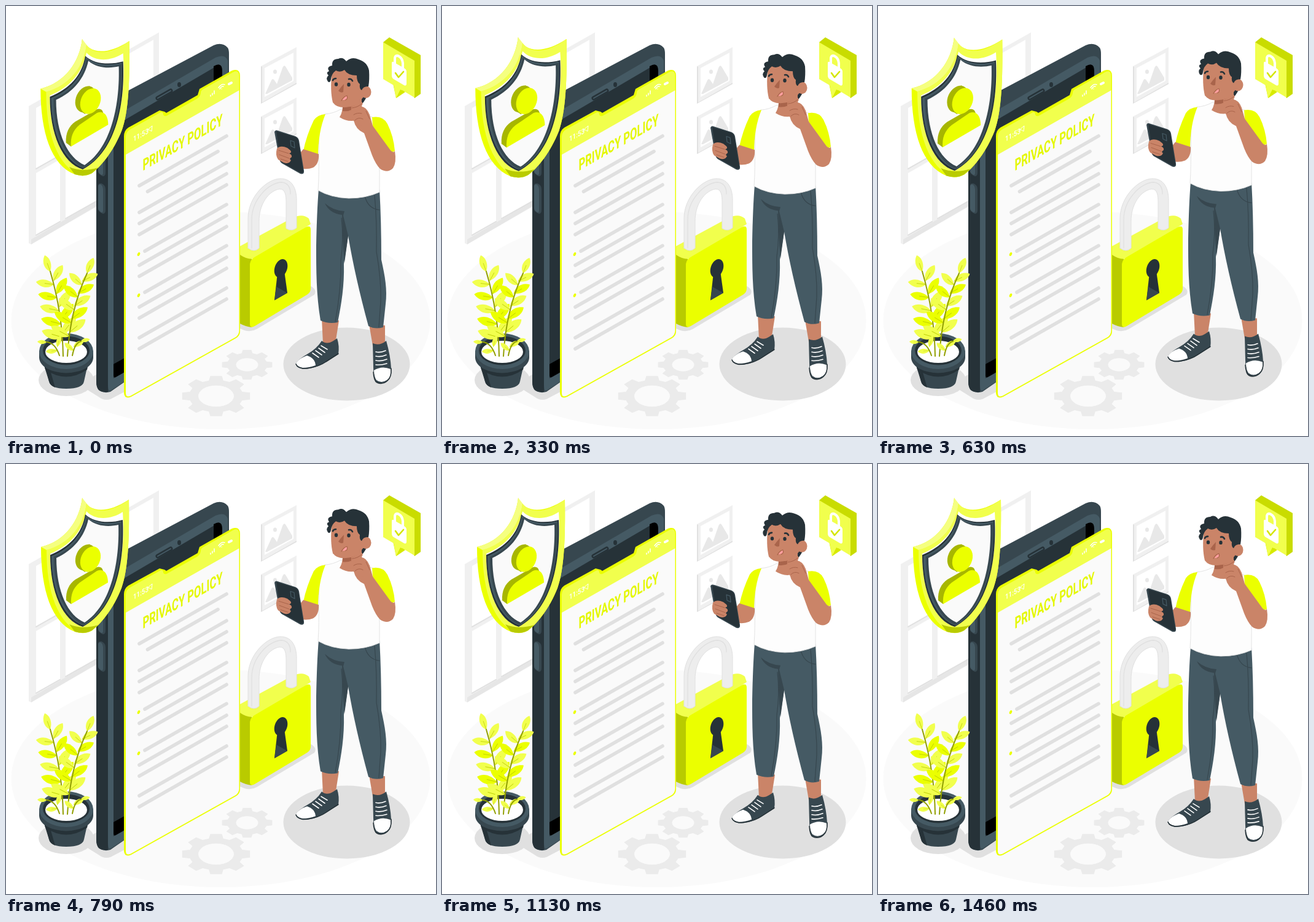
An HTML page with a canvas that plays this animation: 700x700 px, repeating every 1.5 s.

```html
<!DOCTYPE html>
<html lang="en">
<head>
<meta charset="utf-8">
<title>Privacy policy</title>
<style>
html, body { margin: 0; width: 100%; height: 100%; overflow: hidden; background: #fff; }
canvas { display: block; width: 100vw; height: 100vh; }
</style>
</head>
<body>
<canvas id="stage"></canvas>
<script>
const canvas = document.getElementById('stage');
const ctx = canvas.getContext('2d');
const SIZE = 700, LOOP = 1500, FPS = 24;

const YELLOW = '#ebff00', LIGHT = '#f1ff4d', OLIVE = '#b9cb00', DEEP = '#a7b600';
const INK = '#263238', SLATE = '#37474f', STEEL = '#455a64';
const PAPER = '#fafafa', PALE = '#f0f0f0', MIST = '#e0e0e0', WHITE = '#fff';
const SKIN = '#ca8468', SKIN_DARK = '#a9644b';

function fill(color, d) {
  ctx.fillStyle = color;
  ctx.fill(new Path2D(d));
}

function line(color, width, d) {
  ctx.strokeStyle = color;
  ctx.lineWidth = width;
  ctx.lineCap = ctx.lineJoin = 'round';
  ctx.stroke(new Path2D(d));
}

function oval(color, x, y, rx, ry, angle = 0) {
  ctx.fillStyle = color;
  ctx.beginPath();
  ctx.ellipse(x, y, rx, ry, angle, 0, Math.PI * 2);
  ctx.fill();
}

function placed(matrix, draw) {
  ctx.save();
  ctx.transform(...matrix);
  draw();
  ctx.restore();
}

function drawWindow() {
  fill(PALE, 'M37 163 L249 43 V268 L41 388 L37 386 Z');
  fill('#e6e6e6', 'M41 380 L147 318 V326 L41 388 Z');
  const pane = (x1, x2, top, bottom) =>
    fill(WHITE, `M${x1} ${top} L${x2} ${top - (x2 - x1) * .57} V${bottom - (x2 - x1) * .57} L${x1} ${bottom} Z`);
  pane(49, 88, 166, 264);
  pane(97, 150, 139, 237);
  pane(49, 88, 272, 372);
  pane(97, 150, 245, 345);
  pane(196, 240, 80, 240);
  line(MIST, 2, 'M49 265 L88 243 M97 238 L147 210 M49 373 L88 351 M97 346 L147 318');
}

function drawPicture(y) {
  placed([1, 0, 0, 1, 0, y], () => {
    fill(PALE, 'M415 98 L473 67 V126 L415 159 Z');
    fill(WHITE, 'M421 101 L468 76 V122 L421 148 Z');
    fill(MIST, 'M415 98 L417 99 V157 L415 159 Z M417 157 L473 125 V127 L415 159 Z');
    fill('#e8e8e8', 'M422 143 L432 121 Q434 117 437 121 L441 127 L450 101 Q453 94 456 100 L466 117 V121 L425 143 Z');
    oval('#e8e8e8', 438, 107, 3, 3.5);
  });
}

function drawGear(x, y, r, hole) {
  placed([1, 0, 0, .595, x, y], () => {
    ctx.beginPath();
    const step = Math.PI / 4;
    for (let i = 0; i < 8; i++) {
      for (const [offset, radius] of [[-.27, .79], [-.17, 1], [.17, 1], [.27, .79]]) {
        const a = i * step + offset;
        ctx.lineTo(Math.cos(a) * r * radius, Math.sin(a) * r * radius);
      }
    }
    ctx.closePath();
    ctx.moveTo(hole, 0);
    ctx.arc(0, 0, hole, 0, Math.PI * 2, true);
    ctx.fillStyle = '#ebebeb';
    ctx.fill();
  });
}

function drawLeaf(x, y, length, angle, color) {
  const c = Math.cos(angle) * length, s = Math.sin(angle) * length;
  placed([c, s, -s, c, x, y], () => {
    fill(color, 'M0 0 C.2 -.3 .7 -.34 1 -.04 C.75 .25 .3 .22 0 0 Z');
    line(OLIVE, .025, 'M0 0 L.5 -.03');
  });
}

function drawBranch([x0, y0, x1, y1, x2, y2], pairs, size) {
  for (let i = 0; i <= pairs; i++) {
    const u = .22 + .78 * i / pairs, v = 1 - u;
    const x = v * v * x0 + 2 * u * v * x1 + u * u * x2;
    const y = v * v * y0 + 2 * u * v * y1 + u * u * y2;
    const tilt = Math.atan2(v * (y1 - y0) + u * (y2 - y1), v * (x1 - x0) + u * (x2 - x1));
    const length = size * (1 - .25 * u);
    if (i === pairs) {
      drawLeaf(x, y, length, tilt, LIGHT);
    } else {
      drawLeaf(x, y, length, tilt - 1.15, i % 2 ? YELLOW : LIGHT);
      drawLeaf(x, y - 6, length, tilt + .8, i % 2 ? YELLOW : LIGHT);
    }
  }
  line('#919f00', 2, `M${x0} ${y0} Q${x1} ${y1} ${x2} ${y2}`);
}

function drawPlant() {
  oval(MIST, 98, 609, 45, 26);
  fill(SLATE, 'M61 575 L70 611 Q72 623 98 623 Q125 623 127 611 L135 575 Z');
  fill(INK, 'M62 583 Q98 612 134 583 L132 592 Q98 615 64 592 Z');
  fill(INK, 'M61 582 L70 611 Q72 618 80 621 L71 590 Z');
  fill(SLATE, 'M54 561 V573 C57 605 139 605 142 573 V561 Z');
  oval(STEEL, 98, 562, 44, 29);
  oval(INK, 98, 561, 38, 23.5);
  oval(WHITE, 98, 563, 34, 18);
  drawBranch([93, 570, 92, 500, 72, 432], 5, 37);
  drawBranch([100, 570, 104, 495, 132, 435], 5, 36);
  drawBranch([87, 569, 80, 548, 66, 547], 1, 20);
  drawBranch([108, 569, 112, 548, 122, 546], 1, 20);
}

function drawPhone() {
  fill(MIST, 'M127 612 L150 598 L193 612 V628 L170 640 Q160 643 152 637 L128 622 Z');
  fill(SLATE, 'M147 200 Q147 166 172 152 L338 64 Q352 58 361 68 Q363 71 363 78 V500 L193 612 L170 628 Q160 631 152 626 Q147 622 147 611 Z');
  fill(INK, 'M147 230 L166 222 V628 Q157 630 151 625 Q147 621 147 611 Z');
  fill(STEEL, 'M166 210 Q166 187 183 176 L341 84 Q357 77 361 89 V480 L193 611 L170 626 Q166 628 166 617 Z');
  fill(INK, 'M175 215 Q175 198 189 188 L339 100 Q352 94 352 107 V470 L193 596 L175 606 Z');
  fill('#000', 'M338 98 Q352 90 352 106 V120 L338 126 Z M175 583 L193 573 V596 L179 604 Q175 606 175 601 Z');
  line(INK, 7, 'M247 150 L268 138');
  line(STEEL, 2, 'M247 150 L268 138');
  oval(INK, 282, 128, 3, 4);
  for (const y of [228, 289]) {
    fill(SLATE, `M150 ${y + 4} Q150 ${y - 1} 156 ${y} Q162 ${y + 3} 162 ${y + 9} V${y + 43} Q162 ${y + 50} 157 ${y + 49} Q150 ${y + 46} 150 ${y + 40} Z`);
    fill(STEEL, `M150 ${y + 4} Q151 ${y} 155 ${y + 2} Q158 ${y + 5} 158 ${y + 9} V${y + 45} Q157 ${y + 49} 154 ${y + 46} Q150 ${y + 44} 150 ${y + 40} Z`);
  }
}

function textLine(x, y, end) {
  line(MIST, 5.6, `M${x} ${y} L${end} ${y - (end - x) * .57}`);
}

function drawSheet() {
  fill(YELLOW, 'M192 212 Q192 203 199 198 L250 170 L258 172 L261 174 L312 145 L315 135 L368 105 Q381 101 381 114 V530 Q381 537 374 541 L204 636 Q193 641 192 630 Z');
  fill(PAPER, 'M195 241 L379.5 137 V529 Q379 536 373 539.5 L203 634.5 Q195 638 195 630 Z');
  fill(LIGHT, 'M195 242 V213 Q195 205 202 201 L252 173 Q256 172 256 177 Q258 181 263 178 L311 151 Q316 148 317 142 Q317 138 320 136 L371 107 Q379.5 104 379.5 114 V137 Z');

  placed([.82, -.46, 0, 1, 207, 221], () => {
    ctx.fillStyle = WHITE;
    ctx.font = '500 12px Roboto, sans-serif';
    ctx.fillText('11:53', 0, 0);
  });
  line(WHITE, 1, 'M230 202 L238 195 L237 204 L234 202 Z');
  line(WHITE, 1.5, 'M333 147 V145 M336 145 V142 M339 143 V138');
  line(WHITE, 1.5, 'M346 133 Q351 126 356 128 M348 135 Q351 130 354 131 M351 135 V135');
  line(WHITE, 4, 'M363 127 L367 125');

  placed([.64, -.37, 0, 1, 222.5, 268.5], () => {
    ctx.fillStyle = '#e4f800';
    ctx.font = 'bold 26px Roboto, sans-serif';
    ctx.fillText('PRIVACY POLICY', 0, 0);
  });

  textLine(217, 292.5, 359);
  textLine(230.5, 302, 345);
  for (const y of [336, 354, 372, 422, 440, 490, 508, 540, 558]) textLine(217, y, 359);
  for (const y of [404, 471]) {
    textLine(226, y - 5, 359);
    oval(YELLOW, 216, y, 2, 3.2, .4);
  }
}

function drawPadlock() {
  fill(MIST, 'M381 515 L496 456 Q507 462 502 470 L408 526 Q396 533 381 525 Z');
  fill(OLIVE, 'M381 396 L400 406 V523 Q390 522 381 517 Z');
  fill(LIGHT, 'M381 391 L466 345 Q483 337 493 346 L496 355 L410 409 Q397 416 381 405 Z');
  fill(YELLOW, 'M397 420 Q398 412 406 408 L488 360 Q496 356 496 364 V460 Q496 466 490 470 L405 521 Q397 526 397 517 Z');
  const shackle = 'M394 394 V346 C394 310 425 281 447 281 C465 281 473 296 473 316 V361 Q465 368 456 362 V318 C456 300 450 296 441 299 C424 305 412 326 412 350 V394 Q404 402 394 394 Z';
  fill('#ededed', shackle);
  line(MIST, 1, shackle);
  line(MIST, 1.3, 'M400 394 V348 C400 315 428 287 449 287 C459 288 463 295 463 306');
  oval(INK, 447.5, 427, 10, 15.5, .35);
  fill(INK, 'M442 434 L437 479 L458 467 L453 431 Z');
  fill(SLATE, 'M440 457 L458 467 L437 479 Z');
}

function drawBubble() {
  fill('#c9dc00', 'M614 59 L624 51 L675 80 V143 L665 150 Z');
  fill('#d7ea00', 'M630 126 L635 150 L649 139 Z');
  fill(LIGHT, 'M614 59 L665 89 V149 L645 137 L635 150 L631 129 L614 119 Z');
  fill('#d7ea00', 'M642 136 L650 140 L635 150 Z');
  line(WHITE, 4, 'M633 95 V86 C633 76 645 82 646 93 V102');
  fill(WHITE, 'M628 93 Q628 89 632 92 L648 101 Q652 103 652 107 V126 Q652 131 648 129 L631 119 Q628 117 628 113 Z');
  line('#d4e600', 2.6, 'M634 109 L639 116 L647 107');
}

function drawShield() {
  fill(YELLOW, 'M57 135 C96 126 120 92 124 55 C135 80 165 81 200 58 C201 120 199 172 188 202 C175 235 155 260 140 271 Q128 278 112 273 C74 258 57 205 57 135 Z');
  fill(LIGHT, 'M66 140 C104 130 127 99 131 64 C143 81 170 80 200 58 C201 120 199 172 188 202 C175 235 155 260 140 271 Q131 276 122 275 C84 260 66 208 66 140 Z');
  fill('#f5ff80', 'M57 135 C96 126 120 92 124 55 L131 64 C127 99 104 130 66 140 Z');
  fill(OLIVE, 'M103 261 Q124 270 150 262 L140 271 Q128 278 112 273 Z');
  fill(WHITE, 'M72 146 C104 133 125 109 131 77 C146 93 172 90 190 78 C195 150 181 232 125 265 C90 254 72 205 72 146 Z');
  fill(INK, 'M72 148 C104 135 124 113 129 82 C145 97 172 96 190 91 C193 155 181 235 125 265 C92 255 72 208 72 148 Z');
  fill(STEEL, 'M74 150 C106 137 125 114 130 84 C146 98 171 98 188 93 C190 155 179 234 126 263 C95 252 74 208 74 150 Z');
  fill(SLATE, 'M78 151 C108 138 126 117 131 87 C147 101 171 100 187 95 C189 155 177 232 126 262 C98 250 78 208 78 151 Z');
  fill(PAPER, 'M82 153 C110 140 128 118 134 90 C149 103 170 102 183 99 C185 155 173 229 128 258 C101 247 82 208 82 153 Z');
  fill(DEEP, 'M98 222 C97 206 103 195 113 188 L148 168 Q156 166 158 174 L106 228 Z');
  fill(YELLOW, 'M106 228 C105 213 109 202 120 193 L148 174 C160 169 166 180 166 193 Z');
  oval(DEEP, 130, 152, 16, 22, .42);
  fill(DEEP, 'M121 171 L129 176 L139 134 L135 130 Z');
  oval(YELLOW, 137.5, 155, 15.5, 21.5, .42);
}

function drawShoes() {
  fill(SKIN, 'M514 508 L542 512 L536 550 Q526 560 516 549 Z M591 518 L617 520 V553 Q608 560 597 553 Z');
  fill(SLATE, 'M514 545 Q522 552 533 545 L539 541 Q543 553 541 567 L520 580 Q503 591 483 591 Q471 588 472 581 Q479 573 490 567 Q506 558 514 545 Z');
  fill(WHITE, 'M472 581 Q478 573 490 569 Q503 573 504 585 Q493 589 483 589 Q473 587 472 581 Z');
  line(INK, 1.5, 'M472 583 Q475 591 490 590 Q510 587 521 579 L541 566');
  line(WHITE, 1.6, 'M499 565 L509 572 M504 561 L514 568 M509 557 L519 564 M513 553 L523 559');
  fill(SLATE, 'M597 549 Q608 554 619 545 Q626 570 627 590 Q628 604 620 611 Q611 617 602 612 Q598 604 598 588 Z');
  fill(WHITE, 'M599 593 Q612 585 626 591 Q628 603 620 609 Q611 615 603 609 Q599 603 599 593 Z');
  line(INK, 1.5, 'M598 596 Q599 611 604 613 Q613 617 621 610 Q628 604 627 590');
  line(WHITE, 1.6, 'M602 563 Q609 565 618 561 M602 570 Q610 572 619 568 M602 577 Q610 579 620 575 M602 584 Q610 585 620 582');
}

function drawTrousers() {
  fill(STEEL, 'M509 298 L608 298 Q611 350 611 413 C617 440 621 462 618 485 L614 523 Q601 527 590 521 Q568 440 557 374 L550 420 C551 455 546 485 540 515 Q525 518 512 512 C505 470 505 430 505 390 Q506 335 509 298 Z');
  fill(SLATE, 'M519 321 Q532 333 551 334 L549 341 L557 374 L551 418 Q549 395 548 374 L547 340 Q527 338 519 321 Z');
  line(SLATE, 1.2, 'M584 309 Q589 330 608 332 M600 308 Q604 350 603 400 Q611 445 610 480 L607 523 M546 345 Q550 380 545 415 Q546 460 536 514');
}

function drawHead() {
  fill(INK, 'M574 145 L591 138 Q586 153 579 160 Z');
  fill(SKIN, 'M548 156 L579 145 V183 Q560 192 543 181 Q549 172 548 156 Z');
  fill(SKIN_DARK, 'M548 162 Q560 167 573 160 Q564 173 548 171 Z');
  fill(SKIN, 'M531 106 C528 127 529 145 532 157 Q540 168 559 164 Q573 161 582 148 L583 105 Q554 92 531 106 Z');
  oval(SKIN, 586, 140, 8.5, 10);
  fill(INK, 'M524 123 Q520 117 525 113 Q520 108 526 106 Q521 99 531 97 Q530 86 541 86 Q548 82 554 90 Q563 82 574 87 Q588 91 591 105 Q592 120 590 131 Q582 130 579 137 Q575 135 576 127 Q571 124 571 113 Q556 113 551 104 Q544 109 537 105 Q530 110 529 119 Q528 126 524 123 Z');
  oval(INK, 537.5, 127.5, 2.7, 3.2);
  oval(INK, 558, 128, 2.7, 3.2);
  line(INK, 2.6, 'M532 121 Q533 118 537 118 M558 119 Q562 118 564 122');
  fill(SKIN_DARK, 'M550 127 Q545 132 541 138 Q545 142 549 140 Z');
  fill('#ff9f9f', 'M547 153 Q551 148 555 146 Q557 152 552 153 Z');
  line(SKIN_DARK, 1.2, 'M546 154 Q550 147 555 146 Q557 152 552 153');
}

function drawHandset() {
  fill(SKIN, 'M484 233 L509 241 Q510 257 500 263 Q490 267 478 264 L474 245 Z');
  fill(SLATE, 'M437 205 Q438 201 443 203 L471 212 Q476 214 477 219 L485 268 Q486 275 479 273 L449 256 Q446 254 445 249 Z');
  fill(INK, 'M440 204 L471 213 Q475 215 476 220 L484 268 Q484 273 479 271 L450 255 Q447 253 446 248 Z');
  line(STEEL, 1.2, 'M463 219 L469 221 L470 231 L464 228 Z');
  fill(SKIN, 'M441 232 Q447 226 458 231 L463 235 Q466 239 461 240 Q466 242 465 246 Q460 249 464 251 Q461 258 452 255 L443 250 Q438 243 441 232 Z');
  line(SKIN_DARK, 1, 'M444 235 L460 240 M445 242 L461 248 M447 249 L459 253');
}

function drawMan() {
  drawShoes();
  drawTrousers();
  const shirt = 'M519 176 Q533 175 545 168 Q557 180 577 177 L597 181 Q610 235 608 303 Q586 313 558 313 Q529 312 508 300 C511 260 507 220 512 186 Z';
  fill('#fdfdfd', shirt);
  line(MIST, .9, shirt);
  fill(YELLOW, 'M520 176 Q507 177 501 186 Q489 211 484 236 Q494 244 508 245 Q508 205 520 176 Z');
  fill(YELLOW, 'M596 181 Q614 178 621 192 Q631 212 633 236 L627 239 Q611 220 597 197 Z');
  drawHead();
  fill(SKIN, 'M597 195 L626 235 Q631 240 633 236 Q636 255 630 264 Q621 273 609 265 Q602 258 596 243 L583 207 Q569 201 566 186 L575 164 Q586 162 592 177 Z');
  fill(SKIN, 'M562 164 Q571 162 577 155 Q583 157 579 163 L586 172 L584 196 Q567 193 565 184 Q563 179 566 177 Q561 172 562 164 Z');
  line(SKIN_DARK, 1, 'M563 166 Q573 165 579 159 M566 177 Q572 173 579 175 M568 186 Q574 180 581 184 M586 171 L592 184');
  drawHandset();
}

const easeOut = u => 1 - (1 - u) ** 1.7;
const easeIn = u => u ** 1.7;
const linear = u => u;

// Keys are [time, value, easing towards the next key].
function track(keys, t) {
  const i = Math.max(1, keys.findIndex(key => key[0] > t));
  const [t0, v0, ease = linear] = keys[i - 1];
  const [t1, v1] = keys[i];
  return v0 + (v1 - v0) * ease((t - t0) / (t1 - t0));
}

const BEAT = [[0, 1, easeOut], [150, 1.092, easeIn], [255, .975, easeOut], [495, 1.092, easeIn], [675, 1], [1600, 1]];
const BOB = [[0, 0], [130, -3.1], [330, -6.7], [500, -9.9], [630, -11.6], [740, -12], [850, -11.5],
  [960, -9.8], [1080, -7], [1250, -3.8], [1380, -1.3], [1460, -.1], [1600, 0]];

function render(t) {
  ctx.setTransform(canvas.width / SIZE, 0, 0, canvas.height / SIZE, 0, 0);
  ctx.fillStyle = WHITE;
  ctx.fillRect(0, 0, SIZE, SIZE);

  oval(PAPER, 349.5, 512, 341, 177);
  drawWindow();
  drawPicture(0);
  drawPicture(82);
  oval(MIST, 554.5, 583, 103, 59.5);
  drawGear(342, 635, 56, 29);
  drawGear(392.5, 584, 41.5, 18);
  drawPadlock();
  drawPhone();
  drawSheet();
  drawPlant();
  drawBubble();

  const beat = track(BEAT, t + 10);
  placed([beat, 0, 0, beat, 128.5 * (1 - beat), 165.5 * (1 - beat)], drawShield);
  placed([1, 0, 0, 1, 0, track(BOB, t)], drawMan);
}

function resize() {
  const ratio = window.devicePixelRatio || 1;
  canvas.width = Math.round(innerWidth * ratio);
  canvas.height = Math.round(innerHeight * ratio);
}

const start = performance.now();
function tick() {
  const t = (performance.now() - start) % LOOP;
  const step = Math.floor((t + 4) * FPS / 1000);
  render(step * 1000 / FPS % LOOP);
  requestAnimationFrame(tick);
}

addEventListener('resize', resize);
resize();
tick();
</script>
</body>
</html>
```
